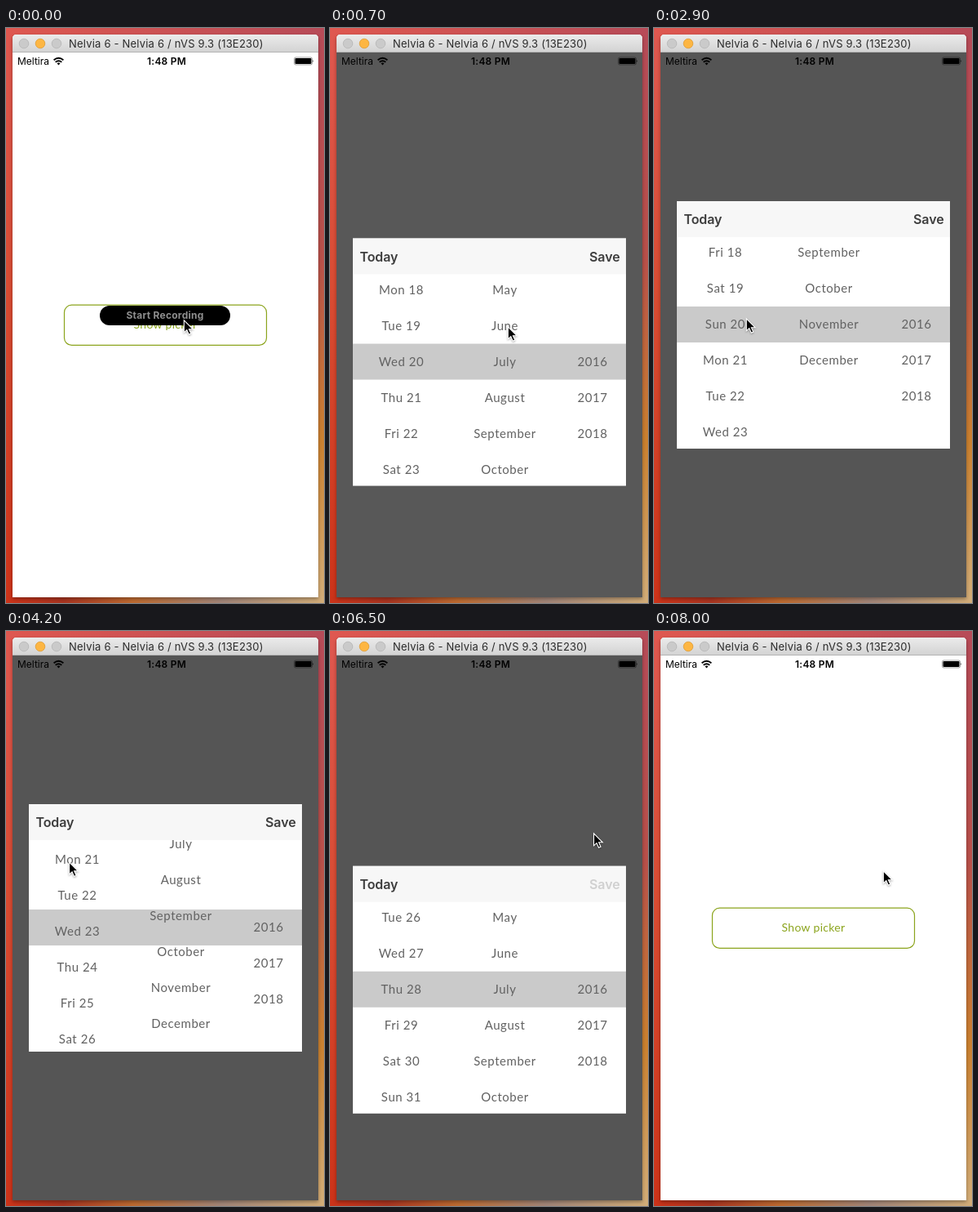
These frames come from a looping animation (390x704 px, 8.1 s). An HTML page:

```html
<!DOCTYPE html>
<html lang="en">
<head>
<meta charset="utf-8">
<title>Date picker</title>
<style>
  html, body { margin: 0; width: 100%; height: 100%; overflow: hidden; }
  svg { display: block; width: 390px; height: 704px; }
  text { font-family: Inter, Roboto, sans-serif; }
  .mid { text-anchor: middle; }
  .soft { font-family: Lato, "Open Sans", sans-serif; }
  #wheels text { font-size: 15px; letter-spacing: .55px; fill: #626262; text-anchor: middle; }
  .bar { font-size: 16px; font-weight: 600; letter-spacing: -.1px; }
</style>
</head>
<body>
<svg viewBox="0 0 390 704">
  <defs>
    <linearGradient id="left" x2="0" y2="1">
      <stop stop-color="#df5850"/><stop offset=".45" stop-color="#d94c33"/><stop offset="1" stop-color="#cd3319"/>
    </linearGradient>
    <linearGradient id="right" x2="0" y2="1">
      <stop stop-color="#b74b58"/><stop offset=".4" stop-color="#b9504a"/>
      <stop offset=".72" stop-color="#cb812f"/><stop offset="1" stop-color="#d3ad78"/>
    </linearGradient>
    <linearGradient id="top">
      <stop stop-color="#df5850"/><stop offset="1" stop-color="#b74b58"/>
    </linearGradient>
    <linearGradient id="bottom">
      <stop stop-color="#cd3319"/><stop offset=".18" stop-color="#a83420"/><stop offset=".4" stop-color="#bd6a30"/>
      <stop offset=".68" stop-color="#a28578"/><stop offset="1" stop-color="#d3ad78"/>
    </linearGradient>
    <linearGradient id="title" x2="0" y2="1">
      <stop stop-color="#ebebeb"/><stop offset="1" stop-color="#d2d2d2"/>
    </linearGradient>
    <clipPath id="screen"><path d="M8 30h375v667H8z"/></clipPath>
    <clipPath id="wheelBox"><path d="M0 44h335v259H0z"/></clipPath>
  </defs>

  <rect width="195" height="704" fill="url(#left)"/>
  <rect x="195" width="195" height="704" fill="url(#right)"/>
  <rect width="390" height="9" fill="url(#top)"/>
  <rect y="696" width="390" height="8" fill="url(#bottom)"/>

  <path d="M8 697V13q0-5 5-5h365q5 0 5 5v684z" fill="#fff" style="filter:drop-shadow(0 2px 2px #0005)"/>
  <path d="M8 30V13q0-5 5-5h365q5 0 5 5v17z" fill="url(#title)"/>
  <path d="M8 29.5h375" stroke="#b4b4b4"/>
  <g fill="#cacaca" stroke="#b5b5b5" stroke-width=".8">
    <circle cx="22" cy="19" r="5.8"/>
    <circle cx="42" cy="19" r="5.8" fill="#fdb643" stroke="#df9c34"/>
    <circle cx="62" cy="19" r="5.8"/>
  </g>
  <text x="77" y="24" font-size="13" letter-spacing=".2" fill="#2b2b2b">Nelvia 6 - Nelvia 6 / nVS 9.3 (13E230)</text>

  <text x="14" y="45" font-size="12">Meltira</text>
  <g fill="none" stroke="#000" stroke-width="1.8">
    <path d="M58.6 39.3q5.9-5 11.8 0M60.7 41.8q3.8-3.2 7.6 0"/>
    <path d="M62.5 43.2q2-1.6 4 0l-2 2.2z" fill="#000" stroke="none"/>
  </g>
  <text class="mid" x="197" y="45" font-size="12" font-weight="600" letter-spacing=".2">1:48 PM</text>
  <rect x="353.5" y="36" width="22" height="9" rx="1.8" fill="none" stroke="#0008" stroke-width=".7"/>
  <rect x="354.5" y="37" width="20" height="7" rx="1"/>
  <path d="M376.3 39q1.4 1.5 0 3z"/>

  <rect x="71.5" y="339.2" width="248" height="49.2" rx="9" fill="none" stroke="#8ba41c" stroke-width="1.2"/>
  <text class="mid soft" x="195.5" y="368" font-size="14" letter-spacing=".3" fill="#8ba41c">Show picker</text>

  <g clip-path="url(#screen)">
    <rect id="dim" x="8" y="30" width="375" height="667"/>
    <g id="panel">
      <rect width="335" height="303" fill="#fff"/>
      <rect y="129" width="335" height="44" fill="#cacaca"/>
      <g id="wheels" clip-path="url(#wheelBox)"></g>
      <rect width="335" height="44" fill="#f7f7f7"/>
      <text class="bar" id="today" x="8.5" y="28">Today</text>
      <text class="bar" id="save" x="327.5" y="28" text-anchor="end">Save</text>
    </g>
  </g>

  <g id="pill">
    <rect x="115" y="340" width="160" height="24" rx="12"/>
    <text class="mid" x="195" y="356" font-size="12" font-weight="700" letter-spacing=".25" fill="#8f8f8f">Start Recording</text>
  </g>

  <g id="pointer">
    <circle id="ring" cx=".5" cy="1" r="21.2" fill="none" stroke="#000" stroke-width="3"/>
    <path d="M.3.8v15l3.5-3.2 2.5 5.6 2.5-1.1-2.4-5.4h4.7z" stroke="#fff" stroke-width="1.1" style="filter:drop-shadow(0 1px 1px #0005)"/>
  </g>
</svg>
<script>
const LOOP = 8100, STEP = 100, TRAVEL = 300, SPIN = 600, ROW = 44, TOP = 212, BOTTOM = 697;
const MONTHS = ['January', 'February', 'March', 'April', 'May', 'June', 'July',
  'August', 'September', 'October', 'November', 'December'];
const DAYS = ['Sun', 'Mon', 'Tue', 'Wed', 'Thu', 'Fri', 'Sat'];

const el = id => document.getElementById(id);
const set = (id, name, value) => el(id).setAttribute(name, value);
const mix = (a, b, p) => a + (b - a) * p;
const progress = (t, from, span) => Math.min(1, Math.max(0, (t - from) / span));
const smooth = p => p * p * (3 - 2 * p);
const easeOut = p => 1 - (1 - p) ** 3;

// The pointer's script: it rests after each gesture, then travels to the next.
const drag = (down, x, from, to, span = 300) => ({ down, x, from, to, span });
const click = (down, x, y) => drag(down, x, y, y, 100);
const rest = (down, x, y) => drag(down, x, y, y, 0);
const todayTap = click(4000, 62, 234), saveTap = click(6200, 338, 231);
const gestures = [
  rest(0, 218, 357), click(300, 218, 365),
  drag(1000, 206, 425, 373), drag(1900, 204, 425, 370), drag(2900, 113, 355, 310),
  todayTap, drag(4400, 121, 420, 355), drag(5000, 122.5, 425, 350),
  saveTap, rest(6700, 281, 293)
];

// Wheel turns: start time and number of rows.
const FIRST_MONTH = 6, FIRST_DAY = 20;
const monthSpins = [[1000, 2], [1900, 2], [4100, -4]];
const daySpins = [[2900, 5], [4100, -5], [4400, 6], [5000, 3], [5300, -1]];
const turned = (spins, t, ease) =>
  spins.reduce((sum, [at, rows]) => sum + rows * ease(progress(t, at, SPIN)), 0);

function wheel(x, labels) {
  const group = document.createElementNS('http://www.w3.org/2000/svg', 'g');
  const rows = labels.map((label, i) => {
    const row = document.createElementNS(group.namespaceURI, 'text');
    row.setAttribute('class', 'soft');
    row.setAttribute('x', x);
    row.setAttribute('y', 156.3 + i * ROW);
    row.textContent = label;
    group.append(row);
    return row;
  });
  el('wheels').append(group);
  return { rows, turn: v => group.setAttribute('transform', `translate(0 ${-v * ROW})`) };
}

const dayWheel = wheel(59.5, Array(31).fill(''));
const monthWheel = wheel(186.5, MONTHS);
wheel(294, [2016, 2017, 2018]);

// Weekdays follow the month only after its wheel has settled.
function nameDays(t) {
  const month = FIRST_MONTH + turned(monthSpins, t - STEP, Math.floor);
  dayWheel.rows.forEach((row, i) => {
    const date = new Date(Date.UTC(2016, month, i + 1));
    const label = date.getUTCMonth() === month ? `${DAYS[date.getUTCDay()]} ${i + 1}` : '';
    if (row.textContent !== label) row.textContent = label;
  });
}

function movePointer(t) {
  const i = gestures.findLastIndex(g => g.down <= t);
  const now = gestures[i], next = gestures[i + 1] || now;
  const y = mix(now.from, now.to, smooth(progress(t, now.down, now.span || 1)));
  const go = smooth(progress(t, next.down - TRAVEL, TRAVEL));
  set('pointer', 'transform', `translate(${mix(now.x, next.x, go)} ${mix(y, next.from, go)})`);
  set('ring', 'opacity', t > now.down && t <= now.down + now.span ? 1 : 0);
}

function draw(t) {
  const tint = (tap, fade) => t >= tap.down && t <= tap.down + fade ? '#d0d0d0' : '#3d3d3d';
  const rise = easeOut(progress(t, 400, 550)), fall = progress(t, 6400, 253) ** 2;
  const shade = easeOut(progress(t, 400, 400)) - smooth(progress(t, 6600, 400));
  set('panel', 'transform', `translate(28 ${mix(BOTTOM, TOP, rise - fall)})`);
  set('dim', 'opacity', .667 * shade);
  set('pill', 'opacity', 1 - progress(t, 0, 200));
  set('today', 'fill', tint(todayTap, 100));
  set('save', 'fill', tint(saveTap, 600));
  nameDays(t);
  dayWheel.turn(FIRST_DAY - 1 + turned(daySpins, t, easeOut));
  monthWheel.turn(FIRST_MONTH + turned(monthSpins, t, easeOut));
  movePointer(t);
}

const start = performance.now();
function tick() {
  const t = (performance.now() - start) % LOOP;
  draw(Math.floor(t / STEP) * STEP);
  requestAnimationFrame(tick);
}
tick();
</script>
</body>
</html>
```
